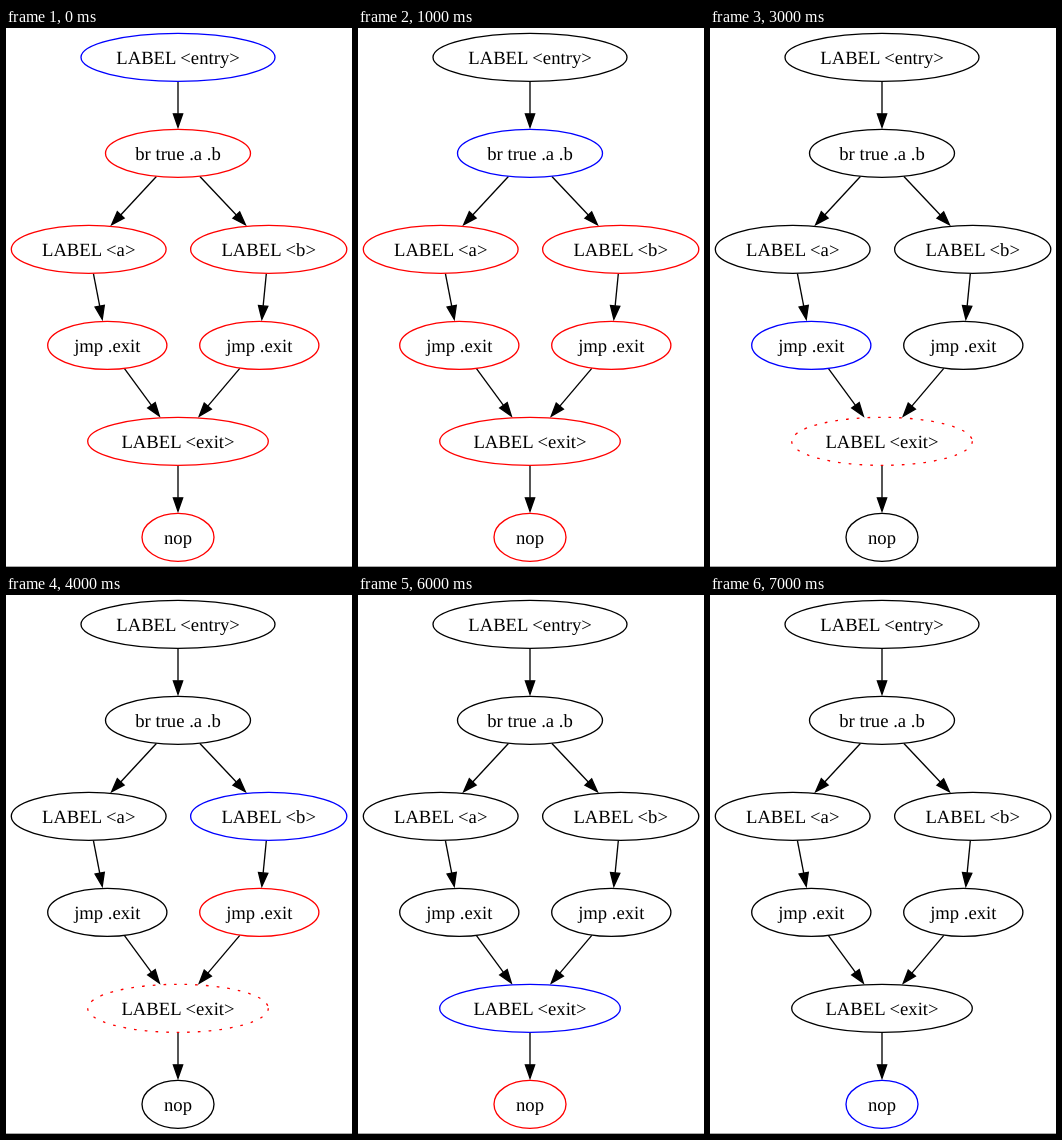
An HTML page with a canvas that plays this animation: 346x539 px, repeating every 8000 ms.

```html
<!DOCTYPE html>
<html lang="en">
<head>
<meta charset="utf-8">
<title>Control flow walk</title>
<style>
html, body { margin: 0; width: 100%; height: 100%; overflow: hidden; background: #fff; }
canvas { display: block; width: 346px; height: 539px; }
</style>
</head>
<body>
<canvas id="stage" width="346" height="539"></canvas>
<script>
const W = 346, H = 539, STEP = 1000;
const PT = 4 / 3;            // pixels per point
const RY = 18 * PT;
const canvas = document.getElementById('stage');
const dpr = window.devicePixelRatio || 1;
canvas.width = W * dpr;
canvas.height = H * dpr;
const ctx = canvas.getContext('2d');
ctx.scale(dpr, dpr);

const node = (label, x, row, rx) => ({ label, x, y: 22 * PT + row * 72 * PT, rx });
const nodes = [
  node('LABEL <entry>', 172, 0, 97),
  node('br true .a .b', 172, 1, 72.5),
  node('LABEL <a>', 82.7, 2, 77.4),
  node('LABEL <b>', 262.7, 2, 78.1),
  node('jmp .exit', 101.3, 3, 59.6),
  node('jmp .exit', 253.3, 3, 59.6),
  node('LABEL <exit>', 172, 4, 90.3),
  node('nop', 172, 5, 36)
];
const edges = [[0, 1], [1, 2], [1, 3], [2, 4], [3, 5], [4, 6], [5, 6], [6, 7]];

// One letter per node: b current, r queued, d queued and dotted, k idle
const steps = [
  'brrrrrrr', 'kbrrrrrr', 'kkbkrkdk', 'kkkkbkdk',
  'kkkbkrdk', 'kkkkkbdk', 'kkkkkkbr', 'kkkkkkkb'
];
const colors = { b: '#00f', r: '#f00', d: '#f00', k: '#000' };

function drawNode(n, state) {
  ctx.strokeStyle = colors[state];
  ctx.setLineDash(state === 'd' ? [2 * PT, 6 * PT] : []);
  ctx.beginPath();
  ctx.ellipse(n.x, n.y, n.rx, RY, 0, 0, 2 * Math.PI);
  ctx.stroke();
  ctx.setLineDash([]);
  ctx.fillStyle = '#000';
  ctx.fillText(n.label, n.x, Math.round(n.y + 6.7));
}

function drawEdge(a, b) {
  const len = Math.hypot(b.x - a.x, b.y - a.y);
  const ux = (b.x - a.x) / len, uy = (b.y - a.y) / len;
  const reach = n => 1 / Math.hypot(ux / n.rx, uy / RY);
  const at = (d, side = 0) => [a.x + ux * d - uy * side, a.y + uy * d + ux * side];
  const tip = len - reach(b) - 1.62 * PT;
  const base = tip - 10 * PT, half = 3.5 * PT;
  ctx.strokeStyle = ctx.fillStyle = '#000';
  ctx.beginPath();
  ctx.moveTo(...at(reach(a) + 0.3 * PT));
  ctx.lineTo(...at(base));
  ctx.stroke();
  ctx.beginPath();
  ctx.moveTo(...at(base, half));
  ctx.lineTo(...at(tip));
  ctx.lineTo(...at(base, -half));
  ctx.closePath();
  ctx.fill();
  ctx.stroke();
}

function draw(states) {
  ctx.fillStyle = '#fff';
  ctx.fillRect(0, 0, W, H);
  ctx.fillStyle = '#aaa';
  ctx.fillRect(0, H - 1, W, 1);
  ctx.lineWidth = PT;
  ctx.font = 14 * PT + 'px "Liberation Serif", "Times New Roman", serif';
  ctx.textAlign = 'center';
  ctx.textRendering = 'geometricPrecision';
  for (const [from, to] of edges) drawEdge(nodes[from], nodes[to]);
  nodes.forEach((n, i) => drawNode(n, states[i]));
}

const start = performance.now();
function tick() {
  const t = performance.now() - start;
  draw(steps[Math.floor(t / STEP) % steps.length]);
  requestAnimationFrame(tick);
}
tick();
</script>
</body>
</html>
```
